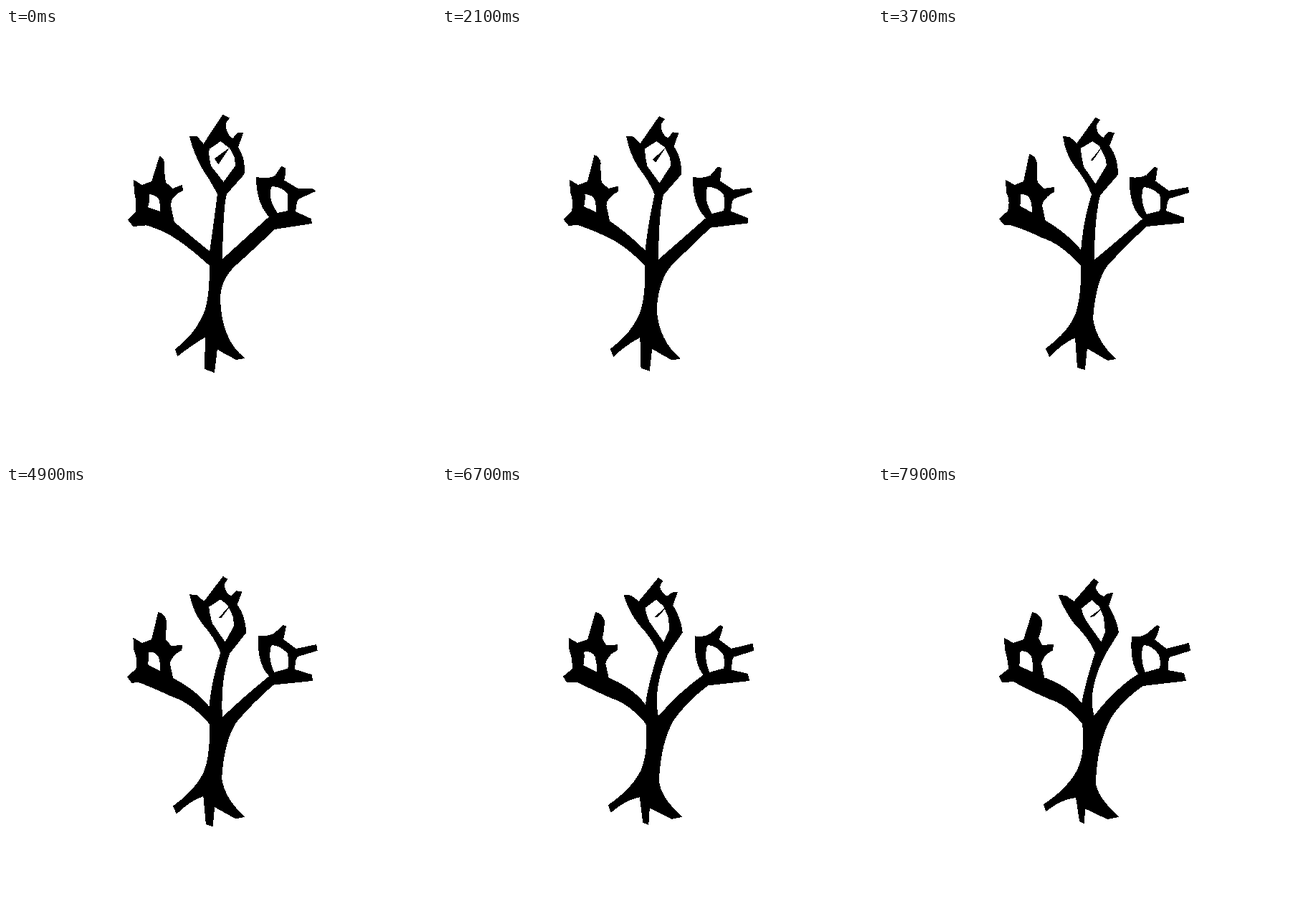
Recreate the animation shown at these times as an HTML page. Size 600x600 px, loop 8 s.

```html
<!DOCTYPE html>
<html>
<head>
<meta charset="utf-8">
<style>
  html, body { margin: 0; width: 100%; height: 100%; overflow: hidden; background: #fff; }
  svg { display: block; width: 100vw; height: 100vh; }
  path { stroke: #000; stroke-linejoin: round; fill-rule: evenodd; shape-rendering: crispEdges; }
</style>
</head>
<body>
<svg viewBox="-0.5 -0.5 600 600"></svg>
<script>
const LOOP = 8000, STEP = 100;
const TIMES = [0, 3700, 7900];

// Each part: the same outline in three poses, blended number by number.
const parts = {
  trunk: [
    'M231 268Q258 291 284 312Q290 271 295 231L298 226L305 226L307 231Q302 250 301 323L367 263L374 280Q345 308 318 332Q298 352 298 378Q300 435 332 460L321 462Q306 455 294 447L290 480L277 475L278 430Q255 444 239 457L236 448Q264 427 277 395Q284 375 284 331Q250 300 225 286Q205 276 180 270Z',
    'M232 268Q262 285 283 310Q287 265 298 232L299 226L308 226L309 233Q301 265 301 324Q330 300 369 266L374 276Q345 303 320 330Q303 352 299 405Q304 437 331 461L320 463Q305 454 291 446L288 476L278 473L275 431Q255 440 239 458L234 447Q264 425 275 400Q284 375 283 331Q255 300 229 292Q205 280 178 272Z',
    'M234 268Q268 281 284 304Q288 279 303 232L304 226L315 226L317 233Q290 285 301 321Q330 283 363 262L369 278Q338 300 323 325Q305 360 303 412Q303 432 335 461L320 464Q304 457 288 449L287 470L281 467L276 434Q255 436 234 453L231 444Q264 422 278 396Q290 370 285 331Q262 303 240 297Q205 282 182 268Z'
  ],
  left: [
    'M177 276L170 267L181 256Q182 240 179 229L178 212L189 219L203 214L214 179Q219 181 220 187Q220 205 222 215L232 224L245 219L246 226Q236 230 230 240L229 247L234 271ZM200 231Q210 232 214 240L215 248L215 256L197 250Q200 240 199 231Z',
    'M176 274L169 266L181 255Q185 240 179 229L178 212L190 219L203 214L211 176Q219 178 221 188Q220 205 222 215L231 224L245 222L245 228Q235 233 229 243L228 247L233 270ZM199 231Q210 231 213 240L215 251L215 258L197 248Q199 240 198 232Z',
    'M173 273L169 265L182 255Q181 240 177 228L176 212L188 219L203 214L215 176Q225 178 228 188Q228 200 223 212L228 222L244 221L243 229Q234 232 229 242L227 247L232 270ZM200 229Q210 230 214 237L216 248L216 260L196 251Q198 240 197 232Z'
  ],
  middle: [
    'M256 151L266 151L275 162L302 121L311 125Q304 133 306 138Q308 150 316 154L323 146L330 146L323 166Q333 180 332 203L307 231L295 231Q285 212 274 196Q262 175 256 151ZM299 157L312 167L319 180L320 192L303 215L285 192Q281 174 283 168Z',
    'M258 151L267 152L277 161L303 125L309 128Q303 134 304 139Q306 150 314 153L321 145L329 146L322 164Q334 180 334 204L309 233L298 232Q291 212 274 192Q262 176 258 151ZM299 157L309 164L317 180L319 191L303 218L286 193Q282 175 282 167Z',
    'M252 152L262 153L273 161L301 129L307 134Q301 140 304 145Q309 153 315 154L320 150L327 149L321 167Q332 185 335 204L317 233L303 232Q293 210 274 192Q258 170 252 152ZM298 158L309 168L315 183L317 203L311 218L289 187Q284 178 283 170Z'
  ],
  eye: [
    'M310 168L296 189L291 182Z',
    'M310 168L299 184L297 184Z',
    'M311 171L301 181L296 182Z'
  ],
  right: [
    'M349 208Q365 211 375 206L384 193L389 195Q389 208 387 212L407 224L427 224L431 227L407 238L405 242L403 256L425 266L426 272L374 280L367 263Q349 243 349 208ZM371 220Q386 221 393 231Q394 245 393 255L378 258Q364 238 369 222Z',
    'M351 208Q365 210 374 205L385 194L389 195Q387 210 386 213L405 227L432 222L433 229L406 237L403 242L401 255L426 264L426 271L374 276L369 266Q350 250 351 208ZM371 221Q383 222 393 232Q396 245 393 255L374 260Q364 240 369 222Z',
    'M354 210Q367 212 376 205L389 194L392 196Q389 208 385 214L402 227L433 219L435 229L406 238L404 245L404 257L426 261L429 271L369 278L363 262Q351 245 354 210ZM371 221Q383 222 392 235Q395 245 393 254L372 260Q364 240 369 222Z'
  ]
};

const svg = document.querySelector('svg');

// Spell straight lines as quadratics, so that every pose has the same structure.
function parse(outline) {
  const out = [];
  let x, y;
  for (const [, cmd, args] of outline.matchAll(/([MLQZ])([\d ]*)/g)) {
    const p = args.split(' ').filter(Boolean).map(Number);
    if (cmd === 'L') out.push('Q', (x + p[0]) / 2, (y + p[1]) / 2, ...p);
    else out.push(cmd, ...p);
    if (p.length) [x, y] = p.slice(-2);
  }
  return out;
}

const shapes = Object.values(parts).map(outlines => {
  const path = document.createElementNS(svg.namespaceURI, 'path');
  svg.append(path);
  return { path, poses: outlines.map(parse) };
});

function draw(t) {
  const i = t < TIMES[1] ? 0 : 1;
  const k = (t - TIMES[i]) / (TIMES[i + 1] - TIMES[i]);
  for (const { path, poses } of shapes) {
    const to = poses[i + 1];
    const blend = poses[i].map((v, n) => typeof v === 'string' ? v : v + (to[n] - v) * k);
    path.setAttribute('d', blend.join(' '));
  }
}

const start = performance.now();
function tick() {
  const t = (performance.now() - start) % LOOP;
  draw(Math.floor(t / STEP) * STEP);
  requestAnimationFrame(tick);
}
tick();
</script>
</body>
</html>
```
